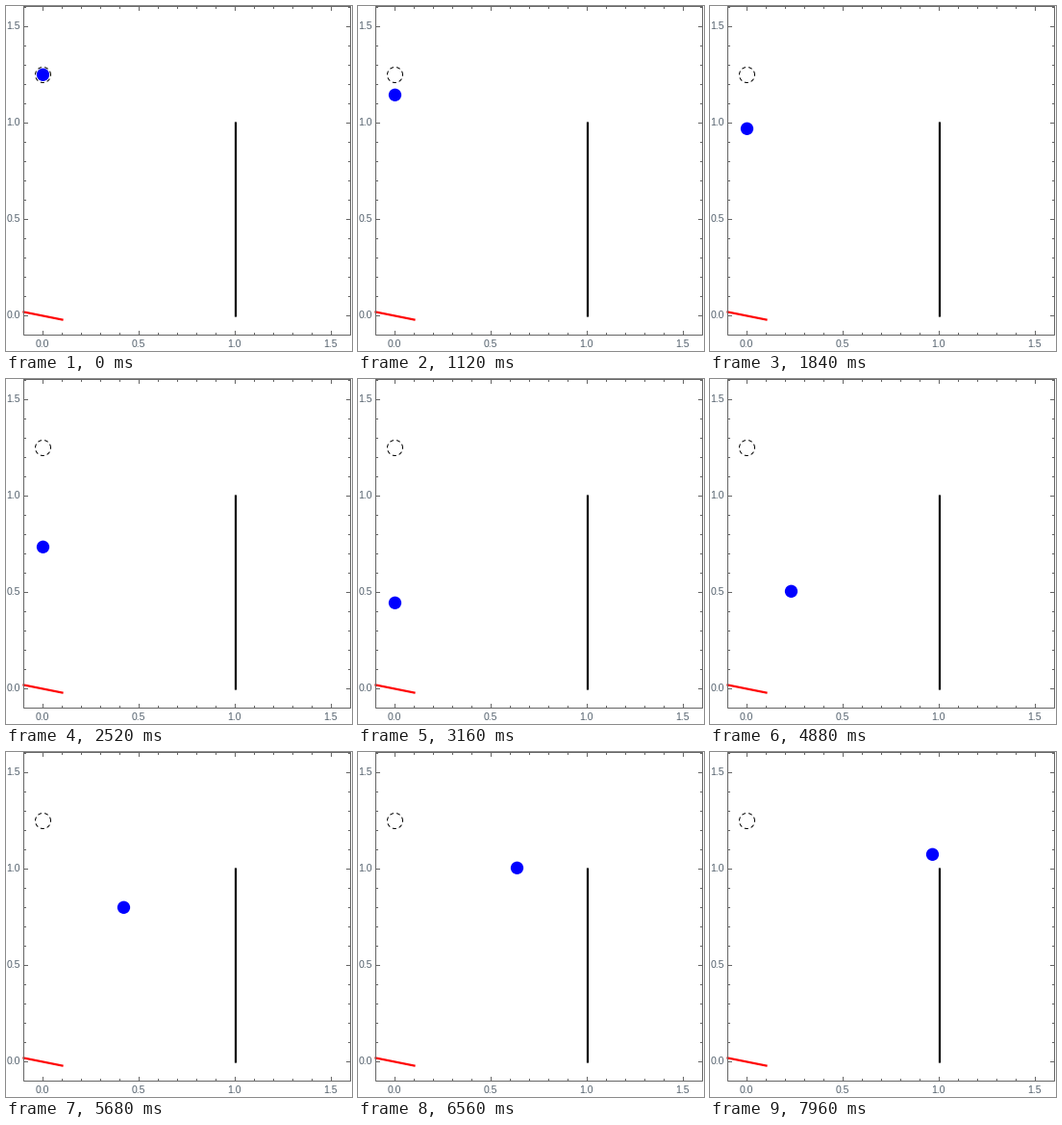
A matplotlib script for the animation above (8 s loop, 360 by 358 pixels).

```python
import numpy as np
import matplotlib.pyplot as plt
from matplotlib.animation import FuncAnimation
from matplotlib.patches import Circle

W, H, DPI = 360, 358, 100
PX = 72 / DPI                      # one pixel in points
FRAMES, INTERVAL = 200, 40

UNIT = 200                         # pixels per data unit
X0, Y0 = 38.5, 321.5               # pixel position of the data origin
LEFT, RIGHT, TOP, BOTTOM = 18.5, 358.5, 0.5, 341.5
GRAY, TEXT = "#666666", "#56636f"

START_Y = 71.08                    # ball centre before the fall
HALF_G = 0.02515                   # half of gravity, px per step squared
HIT = 98.83                        # step at which the ball meets the plate
VX, VY = 1.912, 4.63               # velocity after the bounce, px per step
BALL_DY = 0.3                      # ball centre within its pixel row

plt.rcParams["font.family"] = "Liberation Sans"
fig = plt.figure(figsize=(W / DPI, H / DPI), dpi=DPI, facecolor="white")
ax = fig.add_axes([0, 0, 1, 1])
ax.set_xlim(0, W)
ax.set_ylim(H, 0)
ax.axis("off")


def line(xs, ys, color=GRAY, width=1, z=2, cap="butt", **style):
    ax.plot(xs, ys, color=color, lw=width * PX, solid_capstyle=cap,
            solid_joinstyle="miter", zorder=z, snap=False, **style)


def draw_frame():
    line([LEFT, RIGHT, RIGHT, LEFT, LEFT], [TOP, TOP, BOTTOM, BOTTOM, TOP],
         z=4, cap="projecting")
    for i in range(17):
        major = i % 5 == 0
        size = 4.5 if major else 2.5
        x, y = X0 + i * UNIT / 10, Y0 - i * UNIT / 10
        line([x, x], [BOTTOM, BOTTOM - size])
        line([x, x], [TOP, TOP + size])
        line([LEFT, LEFT + size], [y, y])
        line([RIGHT, RIGHT - size], [y, y])
        if major:
            label = f"{i / 10:.1f}"
            style = dict(size=10.5 * PX, color=TEXT, va="baseline")
            ax.text(x - 1, 353.5, label, ha="center", **style)
            ax.text(15, y + 2.5, label, ha="right", **style)


def draw_start_ring():
    a = np.linspace(0, 2 * np.pi, 120)
    r = 0.04 * UNIT
    line(X0 + r * np.cos(a), Y0 - 1.25 * UNIT - r * np.sin(a), "black", 1, 6,
         ls=(0, (4, 3)), dash_capstyle="butt")


def ball_position(step):
    if step <= HIT:
        x, y = 0, START_Y + HALF_G * step ** 2
    else:
        m = step - HIT
        floor = START_Y + HALF_G * HIT ** 2
        x, y = VX * m, floor - VY * m + HALF_G * m ** 2
    return X0 + round(x), round(y) + BALL_DY


draw_frame()
draw_start_ring()
line([LEFT, X0 + 20], [Y0 - 4, Y0 + 4], "red", 2.2, 3, "projecting")
line([239, 239], [Y0 - UNIT, Y0], "black", 2.2, 3, "projecting")

ball = Circle(ball_position(0), 6.65, fc="blue", ec="none", zorder=5)
ax.add_patch(ball)


def update(i):
    ball.center = ball_position(i + 1)
    return (ball,)


anim = FuncAnimation(fig, update, frames=FRAMES, interval=INTERVAL,
                     repeat=True, repeat_delay=0, blit=False)
plt.show()
```
